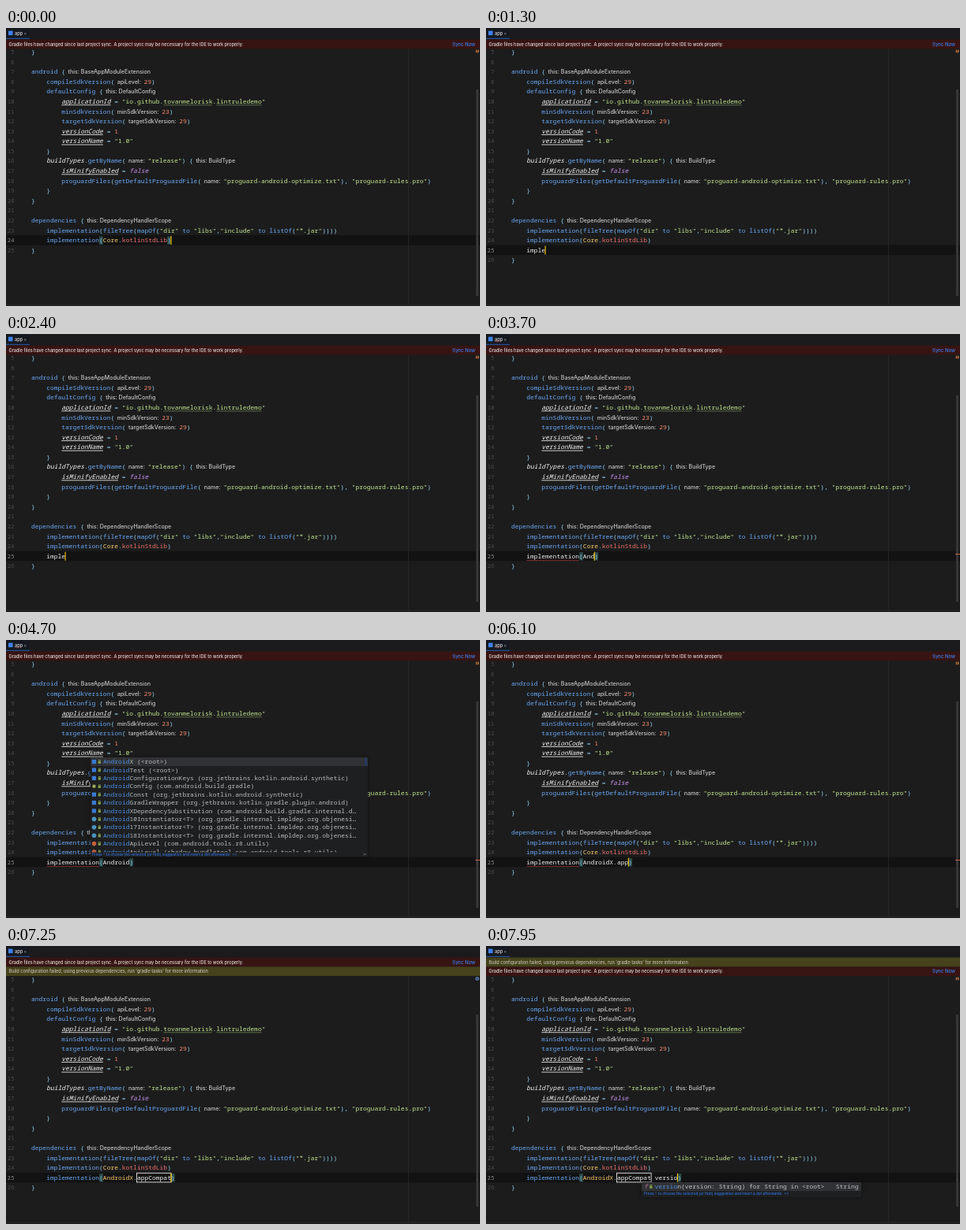
An HTML page with a canvas that plays this animation: 600x353 px, repeating every 8000 ms.

```html
<!DOCTYPE html>
<html lang="en">
<head>
<meta charset="utf-8">
<title>Build script editor</title>
<style>
  html, body { margin: 0; width: 100%; height: 100%; overflow: hidden; background: #1c1c1d; }
  canvas { display: block; width: 600px; height: 353px; }
</style>
</head>
<body>
<canvas id="stage"></canvas>
<script>
const LOOP = 8000, W = 600, H = 353;
const LINE = 12.58, CODE_X = 32, ROW = 10.4;
const MONO_FACE = '7.97px "Noto Sans Mono", monospace';
const MONO = '500 ' + MONO_FACE;
const ui = size => `500 ${size}px Inter, sans-serif`;

const canvas = document.getElementById('stage');
const ctx = canvas.getContext('2d');
const scale = window.devicePixelRatio || 1;
canvas.width = W * scale;
canvas.height = H * scale;

// Style keys: p punctuation, f function, s string, n number, c class, r property,
// k keyword, i italic receiver, v underlined variable, w misspelt string, h inlay hint, t plain
const COLORS = {
  p: '#93d3ee', f: '#6aa9f4', s: '#c3e88d', n: '#f78c6c', c: '#ffcb6b', r: '#f0716a',
  k: '#c792ea', i: '#f4f4f4', v: '#f4f4f4', w: '#c3e88d', h: '#c6c6c6', t: '#eeeeee'
};

const CODE = {
  5: [0, 'p}'],
  7: [0, 'fandroid', 'p {', 'hthis: BaseAppModuleExtension'],
  8: [4, 'fcompileSdkVersion', 'p(', 'hapiLevel:', 'n29', 'p)'],
  9: [4, 'fdefaultConfig', 'p {', 'hthis: DefaultConfig'],
  10: [8, 'vapplicationId', 'p = ', 's"io.github.', 'wtovanmelorisk', 's.', 'wlintruledemo', 's"'],
  11: [8, 'fminSdkVersion', 'p(', 'hminSdkVersion:', 'n23', 'p)'],
  12: [8, 'ftargetSdkVersion', 'p(', 'htargetSdkVersion:', 'n29', 'p)'],
  13: [8, 'vversionCode', 'p = ', 'n1'],
  14: [8, 'vversionName', 'p = ', 's"1.0"'],
  15: [4, 'p}'],
  16: [4, 'ibuildTypes', 'p.', 'fgetByName', 'p(', 'hname:', 's"release"', 'p) {', 'hthis: BuildType'],
  17: [8, 'visMinifyEnabled', 'p = ', 'kfalse'],
  18: [8, 'fproguardFiles', 'p(', 'fgetDefaultProguardFile', 'p(', 'hname:',
    's"proguard-android-optimize.txt"', 'p), ', 's"proguard-rules.pro"', 'p)'],
  19: [4, 'p}'],
  20: [0, 'p}'],
  22: [0, 'fdependencies', 'p {', 'hthis: DependencyHandlerScope'],
  23: [4, 'fimplementation', 'p(', 'ffileTree', 'p(', 'fmapOf', 'p(', 's"dir"', 'f to ', 's"libs"', 'p,',
    's"include"', 'f to ', 'flistOf', 'p(', 's"*.jar"', 'p))))'],
  24: [4, 'fimplementation', 'p(', 'cCore', 'p.', 'rkotlinStdLib', 'p)']
};

const SUGGESTIONS = [
  'X (<root>)', 'Test (<root>)',
  'ConfigurationKeys (org.jetbrains.kotlin.android.synthetic)',
  'Config (com.android.build.gradle)',
  'Const (org.jetbrains.kotlin.android.synthetic)',
  'GradleWrapper (org.jetbrains.kotlin.gradle.plugin.android)',
  'XDepedencySubstitution (com.android.build.gradle.internal.d…',
  '10Instantiator<T> (org.gradle.internal.impldep.org.objenesi…',
  '17Instantiator<T> (org.gradle.internal.impldep.org.objenesi…',
  '18Instantiator<T> (org.gradle.internal.impldep.org.objenesi…',
  'ApiLevel (com.android.tools.r8.utils)',
  'ApiLevel (shadow.bundletool.com.android.tools.r8.utils)'
];

// Timeline in ms
const NEW_LINE = 450, COMPLETE_CALL = 2950, POPUP_OPEN = 4350, POPUP_CLOSE = 5150,
  ACCEPT = 6550, RESOLVED = 6950, BANNER_SWAP = 7750, VERSION_POPUP = 7800;

function typing(text, start, step, t) {
  return text.slice(0, Math.max(0, Math.floor((t - start) / step) + 1));
}

function argumentAt(t) {
  if (t < POPUP_CLOSE) return [typing('Android', 3500, 100, t), '', ''];
  if (t < ACCEPT) {
    const member = typing('.app', 5450, 140, t);
    return ['AndroidX', member.slice(0, 1), member.slice(1)];
  }
  return ['AndroidX', '.', 'appCompat' + typing(' versio', 7450, 70, t)];
}

function rect(x, y, w, h, color) {
  ctx.fillStyle = color;
  ctx.fillRect(x, y, w, h);
}

function widthOf(str, font = MONO) {
  ctx.font = font;
  return ctx.measureText(str).width;
}

function text(str, x, y, color, font = MONO) {
  const width = widthOf(str, font);
  ctx.fillStyle = color;
  ctx.fillText(str, x, y);
  return x + width;
}

function wave(x1, x2, y, color, height = 0.7) {
  ctx.beginPath();
  for (let x = x1, up = 1; x <= x2; x += 1.3, up = -up) ctx.lineTo(x, y + up * height);
  ctx.strokeStyle = color;
  ctx.lineWidth = 0.6;
  ctx.stroke();
}

function dot(x, y, r, color) {
  ctx.fillStyle = color;
  ctx.beginPath();
  ctx.arc(x, y, r, 0, Math.PI * 2);
  ctx.fill();
}

function segment(token, x, y) {
  const kind = token[0], str = token.slice(1), color = COLORS[kind];
  if (kind === 'h') return text(str, x + 3.5, y, color, ui(7.05)) + 3.7;
  const end = text(str, x, y, color, 'kiv'.includes(kind) ? 'italic ' + MONO : MONO);
  if (kind === 'v') rect(x, y + 1.4, end - x, 0.8, color);
  if (kind === 'w') wave(x, end, y + 1.8, '#8fae68', 0.3);
  return end;
}

function segments(tokens, x, y) {
  return tokens.reduce((left, token) => segment(token, left, y), x);
}

function codeLine([indent, ...tokens], y) {
  return segments(tokens, CODE_X + indent * 4.782, y);
}

function bracketBox(x, y) {
  rect(x, y - 7.6, 4.8, 10.4, '#2d4b48');
}

function caret(x, y) {
  rect(x - 0.5, y - 8, 1.1, 11, '#ffcc00');
}

function lock(x, y) {
  rect(x - 1.6, y - 0.6, 3.2, 2.8, '#87a34f');
  ctx.strokeStyle = '#87a34f';
  ctx.lineWidth = 0.7;
  ctx.strokeRect(x - 1, y - 2, 2, 2);
}

function panel(x, y, w, h, rowHeight) {
  ctx.shadowColor = 'rgba(0, 0, 0, .5)';
  ctx.shadowBlur = 4 * scale;
  rect(x, y, w, h, '#1e1f21');
  ctx.shadowBlur = 0;
  rect(x, y, w, rowHeight, '#313235');
}

function popupFooter(x, y) {
  const end = text('Press ^. to choose the selected (or first) suggestion and insert a dot afterwards',
    x, y, '#2f74e0', ui(4.65));
  text('>>', end + 3, y, '#2f74e0', ui(4.65));
}

function androidPopup() {
  const x = 107, y = 149;
  panel(x, y, 351, 126.5, ROW + 0.6);
  ctx.save();
  ctx.beginPath();
  ctx.rect(x, y, 351, 120.5);
  ctx.clip();
  SUGGESTIONS.forEach((rest, i) => {
    const mid = y + 5.6 + i * ROW;
    if (i === 3) dot(111.5, mid, 2.2, '#9fa65b');
    else if (i < 7) rect(108.8, mid - 2.6, 5.2, 5.2, '#397bd3');
    else dot(111.5, mid, 2.8, i < 10 ? '#4a93bf' : '#c0603f');
    lock(118.3, mid);
    const end = text('Android', 123, mid + 2.6, '#4c8fe0');
    text(rest, end, mid + 2.6, '#bcbcbc');
  });
  ctx.restore();
  rect(454, 150, 3, 10, '#243a63');
  popupFooter(109, 273.8);
  text('››', 452, 273.8, '#9a9a9a', ui(5));
}

function versionPopup() {
  panel(197, 300, 278, 19, 11);
  text('f', 200, 308, '#b66b8c', 'italic ' + MONO);
  lock(208.8, 305.6);
  const end = text('versio', 213.5, 308, '#4c8fe0');
  text('n(version: String) for String in <root>', end, 308, '#c4c4c4');
  text('String', 442.8, 308, '#bcbcbc');
  popupFooter(200, 316);
}

function banner(y, failed) {
  rect(0, y, W, 11.6, failed ? '#46421b' : '#371412');
  const message = failed
    ? "Build configuration failed, using previous dependencies, run 'gradle tasks' for more information"
    : 'Gradle files have changed since last project sync. A project sync may be necessary for the IDE to work properly.';
  text(message, 3.5, y + 8, failed ? '#c4c2b4' : '#e2dcdc', ui(5.55));
  if (!failed) text('Sync Now', 565, y + 8, '#3b82f6', ui(6));
}

function header(t) {
  rect(0, 0, W, 14.5, '#1b1b1d');
  rect(0, 0, 30, 13, '#15181f');
  rect(0, 12.8, 30, 1, '#2c5cac');
  rect(3, 3.6, 5.6, 5.6, '#3f83e6');
  text('app', 11, 8.6, '#d6d6d6', ui(5.6));
  text('×', 22.5, 8.6, '#8a8a8a', ui(5.6));
  if (t >= COMPLETE_CALL && t < RESOLVED) wave(11, 20, 9.6, '#c94f4f', 0.4);

  const swapped = t >= BANNER_SWAP;
  banner(swapped ? 26.4 : 14.6, false);
  if (t >= RESOLVED) banner(swapped ? 14.6 : 26.4, true);
}

function activeLine(t, y) {
  const x = CODE_X + 4 * 4.782;
  if (t < COMPLETE_CALL) {
    caret(text(typing('imple', 1000, 60, t), x, y, COLORS.t), y);
    return;
  }
  const resolved = t >= RESOLVED, popup = t >= POPUP_OPEN && t < POPUP_CLOSE;
  const [owner, period, member] = argumentAt(t);
  const open = x + widthOf('implementation');
  const memberX = open + widthOf('(' + owner + period);
  const close = memberX + widthOf(member);
  bracketBox(open, y);
  bracketBox(close, y);
  segments([(resolved ? 'f' : 't') + 'implementation', 'p(', (resolved ? 'c' : 't') + owner,
    'p' + period, 't' + member, 'p)'], x, y);
  if (!resolved) wave(x, open, y + 2.8, '#cf4a45');
  if (t >= ACCEPT) {
    ctx.strokeStyle = '#e6e6e6';
    ctx.lineWidth = 0.9;
    ctx.strokeRect(memberX - 0.4, y - 8.4, widthOf('appCompat') + 0.6, 11.6);
  }
  if (!popup) caret(close, y);
}

function draw(t) {
  ctx.setTransform(scale, 0, 0, scale, 0, 0);
  rect(0, 0, W, H, '#1c1c1d');
  const resolved = t >= RESOLVED;
  const broken = t >= COMPLETE_CALL && !resolved;
  const shift = resolved ? 12 : 0;
  const baseline = n => 33.1 + shift + (n - 5) * LINE;
  const added = t >= NEW_LINE;
  const current = added ? 25 : 24, last = current + 1;

  rect(0, baseline(current) - 9, W, LINE, '#121213');
  rect(509, 14, 0.8, H - 17, '#2a2a2b');
  rect(595, 78 + shift * 0.75, 3, 262 - shift * 1.5, '#363637');
  rect(0, 350.6, W, 1, '#29292a');

  ctx.textAlign = 'right';
  for (let n = 5; n <= last; n++)
    text(n, 10.5, baseline(n), n === current ? '#8c8c8c' : '#4c4c4e', '7.2px "Noto Sans Mono", monospace');
  ctx.textAlign = 'left';

  if (!added) {
    bracketBox(117.9, baseline(24));
    bracketBox(204, baseline(24));
  }
  for (const n in CODE) {
    const end = codeLine(CODE[n], baseline(+n));
    if (+n === 24 && !added) caret(end, baseline(24));
  }
  codeLine([0, 'p}'], baseline(last));
  if (added) activeLine(t, baseline(25));

  header(t);
  const markY = 29.5 + shift;
  if (resolved && t < BANNER_SWAP) {
    dot(596.5, markY, 2.3, '#5b8fc9');
    dot(596.5, markY, 1, '#1c1c1d');
  } else {
    rect(594.8, markY - 1.8, 1.4, 3.6, '#c9793f');
    rect(597, markY - 1.8, 1.4, 3.6, '#c9793f');
  }
  if (broken) rect(594, 279, 6, 1, '#c9603f');

  if (t >= POPUP_OPEN && t < POPUP_CLOSE) androidPopup();
  if (t >= VERSION_POPUP) versionPopup();
}

const start = performance.now();
function frame() {
  draw((performance.now() - start) % LOOP);
  requestAnimationFrame(frame);
}
frame();
</script>
</body>
</html>
```
